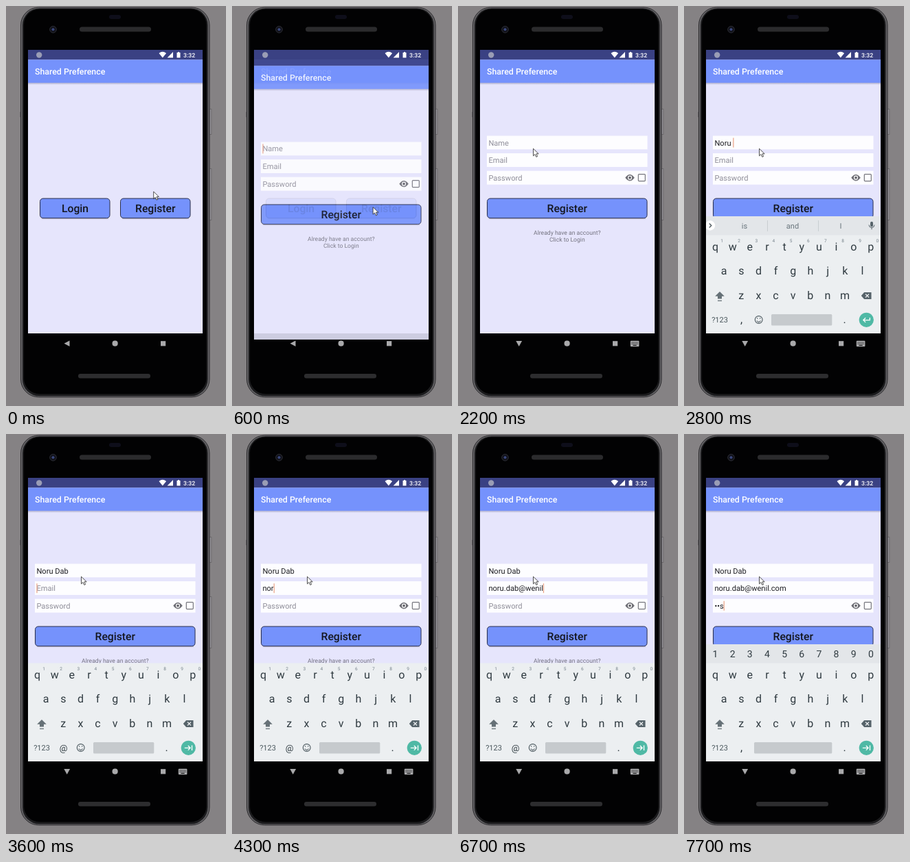
Animation, 320 px wide and 584 px high, one loop 8000 ms. Source, as an HTML page:

```html
<!DOCTYPE html>
<html lang="en">
<head>
<meta charset="utf-8">
<title>Register form</title>
<style>
  html, body { margin: 0; width: 100%; height: 100%; overflow: hidden; background: #858284; }
  svg { display: block; width: 320px; height: 584px; font-family: Roboto, sans-serif; text-rendering: geometricPrecision; }
  text { white-space: pre; }
  .mid { text-anchor: middle; }
  .title { font-size: 12.35px; font-weight: 500; fill: #fff; }
  .label { font-size: 15.7px; font-weight: 500; fill: #15171f; text-anchor: middle; }
  .button { fill: #7592fc; stroke: #2a2e48; stroke-width: 1; }
  .field { font-size: 11.1px; }
  .note { font-size: 8.6px; fill: #747380; text-anchor: middle; }
  .key { font-size: 16px; fill: #2f3a40; text-anchor: middle; }
  .digit { font-size: 14px; }
  .hint { font-size: 6.5px; fill: #75808a; text-anchor: middle; }
  .suggestion { font-size: 11px; fill: #69757c; text-anchor: middle; }
</style>
</head>
<body>
<svg viewBox="0 0 320 584">
  <defs>
    <clipPath id="screenClip"><path d="M32 64H286V478H32Z"/></clipPath>
    <linearGradient id="shade" x2="0" y2="1">
      <stop stop-color="#787799" stop-opacity=".5"/><stop offset="1" stop-color="#787799" stop-opacity="0"/>
    </linearGradient>
    <g id="page">
      <path fill="#e6e5fc" d="M32 64H286V478H32Z"/>
      <path fill="#3a4183" d="M32 64H286V78.5H32Z"/>
      <path fill="#7592fc" d="M32 78.5H286V112.2H32Z"/>
      <path fill="url(#shade)" d="M32 112.2H286V115H32Z"/>
      <text class="title" x="42" y="100.3">Shared Preference</text>
    </g>
  </defs>

  <rect width="320" height="584" fill="#858284"/>
  <g id="phone">
    <path fill="#97959a" stroke="#5d5b5e" stroke-width=".7" d="M296 150.5h2.8v37h-2.8zM296 237.5h2.8v75h-2.8zM20.5 155h2v7h-2z"/>
    <rect x="21.5" y="2" width="274.5" height="569" rx="26" fill="#626164" stroke="#2e2d30"/>
    <rect x="24" y="3.5" width="269.5" height="566" rx="24.5" fill="#1b1b1d"/>
    <rect x="26" y="4.5" width="265.5" height="562" rx="23" fill="#020203"/>
    <circle cx="68.5" cy="34.3" r="4.8" fill="#11121a" stroke="#34353d" stroke-width=".9"/>
    <circle cx="68.5" cy="34.3" r="2" fill="#3a477c"/>
    <rect x="150" y="13" width="17" height="6" rx="3" fill="#0e0e1a"/>
    <rect x="107" y="30.5" width="104" height="7" rx="3.5" fill="#2b2b2d"/>
    <rect x="105" y="537" width="105" height="6.5" rx="3.2" fill="#2d2d2f"/>
  </g>

  <g id="welcome">
    <use href="#page"/>
    <path fill="url(#shade)" d="M52 309.5h97v2.5h-97zM169 309.5h97v2.5h-97z"/>
    <rect class="button" x="49.5" y="281" width="101.5" height="28.7" rx="4.5"/>
    <rect class="button" x="166.5" y="281" width="101.5" height="28.7" rx="4.5"/>
    <text class="label" x="100.5" y="301.3">Login</text>
    <text class="label" x="217.3" y="301.3">Register</text>
  </g>

  <g id="form">
    <use href="#page"/>
    <path fill="#fdfdff" d="M42 189.5h233.5v19.7H42zM42 215h233.5v20H42zM42 240.7h233.5v20H42z"/>
    <g id="fields"></g>
    <rect id="caret" width="1.2" height="14" fill="#e9a184"/>
    <g fill="none" stroke="#75757c" stroke-width="1.2">
      <path fill="#65656c" d="M244 250.7Q250 242.5 256 250.7Q250 258.9 244 250.7Z"/>
      <circle cx="250" cy="250.7" r="2.5" fill="#65656c" stroke="#fff"/>
      <rect x="262.3" y="245.6" width="10" height="10" rx="1"/>
    </g>
    <path fill="url(#shade)" d="M45 309.5h228v2.5H45z"/>
    <rect class="button" x="42.5" y="281" width="232.5" height="28.7" rx="4.5"/>
    <text class="label" x="158.8" y="301.3">Register</text>
    <text class="note" x="158.8" y="333.8">Already have an account?</text>
    <text class="note" x="158.8" y="343.8">Click to Login</text>
  </g>

  <g clip-path="url(#screenClip)">
    <g id="keyboard">
      <g id="strip"><path fill="#e3e6e9" d="M32 307H286V335H32Z"/></g>
      <path fill="#eceff1" d="M32 334.5H286V479H32Z"/>
      <g id="suggestions">
        <path stroke="#c9ced1" d="M121.5 313v16M195.5 313v16"/>
        <circle cx="38" cy="320.5" r="7.2" fill="#fff"/>
        <path d="M36.8 317.5l3 3-3 3" fill="none" stroke="#4a555b" stroke-width="1.3"/>
        <rect x="271" y="314.8" width="4" height="7.4" rx="2" fill="#56636a"/>
        <path d="M269 319.5a4 4 0 0 0 8 0M273 323.5v2.8" fill="none" stroke="#56636a"/>
      </g>
      <g id="digits"></g>
      <g id="hints"></g>
      <g id="letters"></g>
      <path fill="#667177" d="M52 417l6.8 6.8h-3.8v3.8h-6v-3.8h-3.8zM49 429.8h6v1.2h-6z"/>
      <path fill="#56636a" d="M257.8 423l4.3-5h10.4v10h-10.4z"/>
      <path stroke="#eceff1" stroke-width="1.2" d="M264 420.5l5 5m0-5l-5 5"/>
      <text class="mid" x="52" y="462" font-size="11" fill="#4b585e">?123</text>
      <text class="key" id="corner" x="83.5" y="462.5"></text>
      <g id="smiley" fill="none" stroke="#4b585e" stroke-width="1.1">
        <circle cx="108.7" cy="458" r="5.4"/>
        <path d="M105.8 459.5q2.9 3.8 5.8 0M106.7 455.2v1.6M110.7 455.2v1.6"/>
      </g>
      <rect id="space" y="450" height="16.5" rx="1.5" fill="#c6cacd"/>
      <text class="key" x="233.7" y="462.5">.</text>
      <circle cx="265.3" cy="458.3" r="10.6" fill="#4fb9a5"/>
      <path id="enter" fill="none" stroke="#fff" stroke-width="1.3"/>
    </g>
  </g>

  <g fill="#fff">
    <circle cx="48.2" cy="71.5" r="4.2" fill="#9a9db5"/>
    <path d="M222.5 69q5.2-4.4 10.6 0l-5.3 6.6zM243 67v8.6h-8.4zM248.5 68h1.5v-1h2v1h1.5v7.6h-5z"/>
    <text x="258" y="74.8" font-size="8.7" font-weight="500">3:32</text>
  </g>
  <g fill="#a9a9ab">
    <path id="back"/>
    <circle cx="158.6" cy="492.7" r="4.1"/>
    <path d="M225 489.2h7.2v7.2H225z"/>
    <g id="switcher">
      <rect x="250.8" y="488.8" width="12.6" height="8.4" rx="1"/>
      <path stroke="#020203" stroke-dasharray="1.2 1" d="M252.5 491.2h9.5M252.5 493.3h9.5"/>
      <path stroke="#020203" d="M254.5 495.4h5.2"/>
    </g>
  </g>
  <path id="cursor" d="M0 0V10.6L2.5 8.3L4.3 12.2L6.1 11.4L4.4 7.6H7.7Z" fill="#fff" stroke="#222" stroke-width=".8"/>
</svg>
<script>
const LOOP = 8000, TICK = 100;
const $ = id => document.getElementById(id);

function addText(parent, x, y, className, content = "") {
  const node = document.createElementNS("http://www.w3.org/2000/svg", "text");
  node.setAttribute("x", x);
  node.setAttribute("y", y);
  node.setAttribute("class", className);
  node.textContent = content;
  return $(parent).appendChild(node);
}
const addRow = (parent, chars, x, y, className) =>
  [...chars].forEach((c, i) => addText(parent, x + i * 25.15, y, className, c));
const show = (id, on) => $(id).style.display = on ? "" : "none";
const set = (id, attrs) => Object.entries(attrs).forEach(([k, v]) => $(id).setAttribute(k, v));

addRow("letters", "qwertyuiop", 45.5, 357, "key");
addRow("letters", "asdfghjkl", 58.2, 392.3, "key");
addRow("letters", "zxcvbnm", 83.2, 428, "key");
addRow("hints", "1234567890", 55, 344.5, "hint");
addRow("digits", "1234567890", 45.5, 326, "key digit");

const placeholders = ["Name", "Email", "Password"];
const baselines = [203.5, 229.2, 254.8];
const fields = baselines.map(y => addText("fields", 44.4, y, "field"));
const words = [88, 158, 228].map(x => addText("suggestions", x, 324.6, "suggestion"));

// time, field, typed characters, suggestions
const strokes = [
  [600, 0, "", "I The Hi"],
  [2500, 0, "N", "N No Not"], [2600, 0, "o", "Not No Now"], [2700, 0, "ru", "Nor Noru Not"],
  [2800, 0, " ", "is and I"], [3000, 0, "D", "Do D Did"], [3200, 0, "a", "Day Da Dad"],
  [3300, 0, "b", "Dabs Dab Day"],
  [3600, 1, ""],
  [4100, 1, "n"], [4200, 1, "o"], [4300, 1, "r"], [4500, 1, "u"], [4900, 1, "."],
  [5100, 1, "d"], [5200, 1, "a"], [5300, 1, "b"], [5700, 1, "@"],
  [6000, 1, "w"], [6100, 1, "e"], [6200, 1, "n"], [6500, 1, "i"], [6600, 1, "l"], [6800, 1, "."],
  [7000, 1, "c"], [7100, 1, "o"], [7200, 1, "m"],
  [7300, 2, ""], [7600, 2, "pa"], [7700, 2, "s"]
];

// time, x, y of the pointer tip
const pointer = [
  [0, 214.7, 271], [500, 205.2, 293.7], [700, 205, 293.5], [900, 178, 239], [1500, 109.5, 208.2], [LOOP, 109.5, 208.2]
];

function pointerAt(t) {
  const i = pointer.findIndex(p => p[0] > t);
  const [t0, x0, y0] = pointer[i - 1], [t1, x1, y1] = pointer[i];
  const p = (t - t0) / (t1 - t0);
  return [x0 + (x1 - x0) * p, y0 + (y1 - y0) * p];
}

const mask = s => s && "•".repeat(s.length - 1) + s.at(-1);
const progress = (t, start, length) => Math.min(1, Math.max(0, (t - start) / length));

function drawFields(t, done) {
  const values = ["", "", ""];
  done.forEach(([, field, chars]) => values[field] += chars);
  values[2] = mask(values[2]);
  fields.forEach((node, i) => {
    node.textContent = values[i] || placeholders[i];
    node.setAttribute("fill", values[i] ? "#1d1d22" : "#8f8e99");
  });
  const last = done.at(-1);
  const lit = last && (t - last[0]) % 1000 < 500;
  show("caret", lit);
  if (!lit) return;
  const width = values[last[1]] ? fields[last[1]].getComputedTextLength() : 0;
  set("caret", { x: 44.4 + width, y: baselines[last[1]] - 11 });
}

function drawKeyboard(t, [, field, , suggested]) {
  const slide = 172 * (1 - progress(t, 2200, 300)) ** 3;
  set("keyboard", { transform: `translate(0 ${slide})` });
  show("strip", field != 1);
  show("suggestions", field == 0);
  show("digits", field == 2);
  show("hints", field != 2);
  show("smiley", field != 2);
  $("corner").textContent = field == 1 ? "@" : ",";
  $("corner").style.fontSize = field == 1 ? "13px" : "";
  const left = field == 2 ? 102 : 127;
  set("space", { x: left, width: 215.3 - left });
  set("enter", { d: field
    ? "M259.8 458.3h8M264.8 455l3.3 3.3-3.3 3.3M270.5 454.5v7.6"
    : "M270.3 455v3.6h-9.5M264.1 455.3l-3.3 3.3 3.3 3.3" });
  if (suggested) suggested.split(" ").forEach((word, i) => words[i].textContent = word);
}

function draw(now) {
  const t = Math.floor(now % LOOP / TICK) * TICK;
  const opening = progress(t, 515, 350);
  show("form", opening > 0);
  set("form", {
    transform: `translate(0 ${36 * (1 - opening) ** 5})`,
    opacity: progress(t, 515, 95)
  });

  const done = strokes.filter(s => s[0] <= t);
  drawFields(t, done);
  const typing = t >= 2100;
  show("keyboard", typing);
  show("switcher", typing);
  set("back", { d: typing ? "M84.3 489h8.8l-4.4 8z" : "M92.5 488.4v8.6l-8-4.3z" });
  if (typing) drawKeyboard(t, done.at(-1));

  set("cursor", { transform: `translate(${pointerAt(t)})` });
  requestAnimationFrame(draw);
}
requestAnimationFrame(draw);
</script>
</body>
</html>
```
